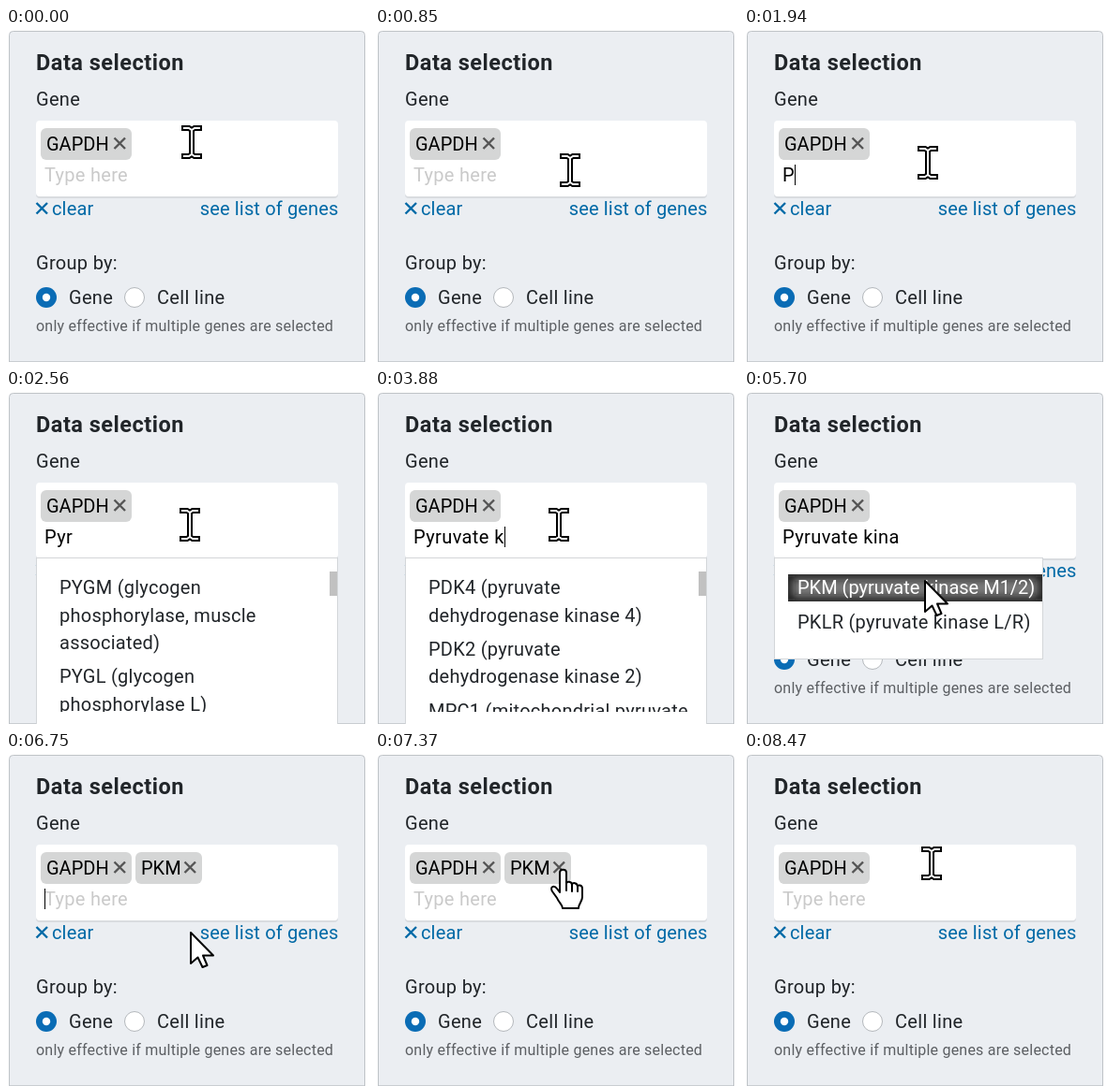
Animation of 387 by 357 pixels, one loop 9370 ms. Source, as an HTML page:

```html
<!DOCTYPE html>
<html lang="en">
<head>
<meta charset="utf-8">
<title>Gene selection</title>
<style>
  html, body { margin: 0; width: 100%; height: 100%; overflow: hidden; background: #fff; }
  svg { display: block; }
  text { font: 20px Roboto, "Open Sans", sans-serif; letter-spacing: .3px; fill: #212529; white-space: pre; }
  .title { font-size: 23.5px; font-weight: 600; letter-spacing: .5px; }
  .note { font-size: 16px; letter-spacing: .22px; fill: #5c5f63; }
  .link text { fill: #0069a6; letter-spacing: .15px; }
  .link path { stroke: #0069a6; }
  .chip rect { fill: #d5d6d6; }
  .chip text { fill: #000; letter-spacing: 0; }
  .chip path { stroke: #555; }
  .list text { letter-spacing: .25px; }
  .list .picked { fill: #fff; }
  #first { letter-spacing: 0; }
  #hint { fill: #cacaca; }
  #typed { fill: #000; letter-spacing: .4px; }
  .menu { fill: #fff; stroke: #d3d6d9; }
  .cross { fill: none; stroke-width: 2.4; }
  .pointer { fill: #fff; stroke: #000; stroke-width: 2; stroke-linejoin: round; stroke-linecap: round; }
</style>
</head>
<body>
<svg id="stage" width="387" height="357" viewBox="0 0 387 357">
  <defs>
    <path id="beam" d="M-8-15H-3L0-13L3-15H8M0-13V13M-8 15H-3L0 13L3 15H8"/>
    <path id="x" class="cross" d="M0 0L11.500 11.500M11.500 0L0 11.500"/>
    <filter id="soft" x="-10%" y="-50%" width="120%" height="200%"><feGaussianBlur stdDeviation="4"/></filter>
    <clipPath id="view"><rect x="33" y="181" width="320" height="163"/></clipPath>
  </defs>

  <rect x="3.5" y="3.5" width="379" height="380" rx="4" fill="#ebeef2" stroke="#bfc3c7"/>
  <path d="M4 356.5H382" stroke="#c9cdd1"/>
  <text class="title" x="32" y="45">Data selection</text>
  <text x="32" y="83">Gene</text>

  <rect x="32" y="100" width="322" height="82" rx="4" fill="#d9dce0"/>
  <rect x="32" y="99" width="322" height="81" rx="4" fill="#fff"/>
  <g class="chip">
    <rect x="37" y="107" width="97" height="34" rx="6"/>
    <text x="43" y="131">GAPDH</text>
    <use href="#x" x="115.5" y="117.5" stroke="#555"/>
  </g>
  <g class="chip" id="added">
    <rect x="138" y="107" width="71" height="34" rx="6"/>
    <text x="144" y="131">PKM</text>
    <use href="#x" x="190.5" y="117.5" stroke="#555"/>
  </g>
  <text id="hint" x="41" y="164">Type here</text>
  <text id="typed" x="41" y="164"></text>
  <rect id="caret" y="146" width="1" height="22"/>

  <g class="link">
    <use href="#x" x="32.5" y="187" stroke="#0069a6"/>
    <text x="49" y="200">clear</text>
    <text x="354.5" y="200" text-anchor="end">see list of genes</text>
  </g>
  <text x="32" y="258">Group by:</text>
  <circle cx="43" cy="288" r="11" fill="#0a6cb5"/>
  <circle cx="43" cy="288" r="4.2" fill="#fff"/>
  <text x="67" y="295">Gene</text>
  <circle cx="137" cy="288" r="10.5" fill="#fff" stroke="#b4b8bc"/>
  <text x="161" y="295">Cell line</text>
  <text class="note" x="32" y="324">only effective if multiple genes are selected</text>

  <g id="long">
    <rect class="menu" x="32.5" y="179.5" width="321" height="190"/>
    <rect x="345" y="194" width="8" height="26" fill="#c1c1c1"/>
    <g clip-path="url(#view)">
      <g class="list" id="glycogen">
        <text x="57" y="218">PYGM (glycogen</text>
        <text x="57" y="248">phosphorylase, muscle</text>
        <text x="57" y="277">associated)</text>
        <text x="57" y="313">PYGL (glycogen</text>
        <text x="57" y="343">phosphorylase L)</text>
      </g>
      <g class="list" id="dehydro">
        <text x="57" y="218">PDK4 (pyruvate</text>
        <text x="57" y="248">dehydrogenase kinase 4)</text>
        <text x="57" y="284">PDK2 (pyruvate</text>
        <text x="57" y="313">dehydrogenase kinase 2)</text>
        <text x="57" y="350">MPC1 (mitochondrial pyruvate</text>
      </g>
    </g>
  </g>

  <g id="short" class="list">
    <rect class="menu" x="32.5" y="179.5" width="286" height="108"/>
    <svg id="hover" x="47" y="197" width="271" height="29">
      <rect width="271" height="29" fill="#777"/>
      <rect width="271" height="29" fill="none" stroke="#151515" stroke-width="8" filter="url(#soft)"/>
    </svg>
    <text id="first" x="57" y="218">PKM (pyruvate kinase M1/2)</text>
    <text x="57" y="255">PKLR (pyruvate kinase L/R)</text>
  </g>

  <g id="cursor">
    <g id="ibeam" fill="none" stroke-linecap="square">
      <use href="#beam" stroke="#000" stroke-width="6"/>
      <use href="#beam" stroke="#fff" stroke-width="2"/>
    </g>
    <path id="arrow" class="pointer" d="M0 0V33L7.500 26.500L12.500 37L17.500 35L13 24.500H24Z"/>
    <g id="hand" class="pointer">
      <path d="M-4 3C-4-1.500 3-1.500 3 3V15C3 11.500 9 12 9 16C9 13 15 13.500 15 18C15 15.500 20 16 20 20V29C20 34 16 36 16 41H-1C-1 37-5 35-7 30L-12 23C-15 18-10 16-7 20L-4 24Z"/>
      <path d="M3 15V22M9 16V23M15 18V23" fill="none"/>
    </g>
  </g>
</svg>
<script>
const LOOP = 9370;
const QUERY = "Pyruvate kina";
const keyTimes = [1940, 2300, 2560, 2780, 2900, 3060, 3300, 3400, 3620, 3880, 4100, 4250, 4450];
// Alternating on and off moments of the text caret
const caretFlips = [980, 1490, 1940, 2560, 2660, 4660, 5160, 5640, 5730, 6220, 6730, 7230, 7730, 8240];
// Pointer hotspot: time, x, y
const path = [
  [0, 198, 122], [630, 198, 122], [770, 214, 138], [860, 207, 154], [980, 196, 144],
  [5090, 196, 144], [5310, 194, 207], [5390, 193, 204],
  [6600, 193, 204], [6900, 200, 182], [7150, 204, 150], [7370, 201, 126], [7560, 200, 125],
  [8220, 200, 125], [8320, 212, 107], [8470, 200, 119], [LOOP, 200, 119]
];

const el = {};
document.querySelectorAll("#stage [id]").forEach(node => el[node.id] = node);

const show = (id, on) => el[id].style.display = on ? "" : "none";
const passed = (times, t) => times.filter(k => k <= t).length;

function pointerAt(t) {
  const i = path.findIndex(p => p[0] > t);
  const [t0, x0, y0] = path[i - 1];
  const [t1, x1, y1] = path[i];
  const u = (t - t0) / (t1 - t0);
  return [x0 + (x1 - x0) * u, y0 + (y1 - y0) * u];
}

function draw(t) {
  const chosen = t >= 5730;
  const hasChip = chosen && t < 8240;
  const value = chosen ? "" : QUERY.slice(0, passed(keyTimes, t));
  if (el.typed.textContent !== value) el.typed.textContent = value;
  show("hint", !value);
  show("added", hasChip);
  show("caret", passed(caretFlips, t) % 2 === 1);
  el.caret.setAttribute("x", 41 + Math.round(value ? el.typed.getComputedTextLength() : 0));

  show("long", t >= 2040 && t < 4010);
  show("glycogen", t < 2800);
  show("dehydro", t >= 2800);
  show("short", t >= 4010 && !chosen);

  const [x, y] = pointerAt(t);
  const hovering = y > 190;
  show("hover", hovering);
  el.first.classList.toggle("picked", hovering);

  const kind = y > 180 ? "arrow" : hasChip && y < 134 ? "hand" : "ibeam";
  for (const id of ["ibeam", "arrow", "hand"]) show(id, id === kind);
  el.cursor.setAttribute("transform", `translate(${Math.round(x)} ${Math.round(y)})`);
}

const start = performance.now();
function tick() {
  draw((performance.now() - start) % LOOP);
  requestAnimationFrame(tick);
}
tick();
</script>
</body>
</html>
```
